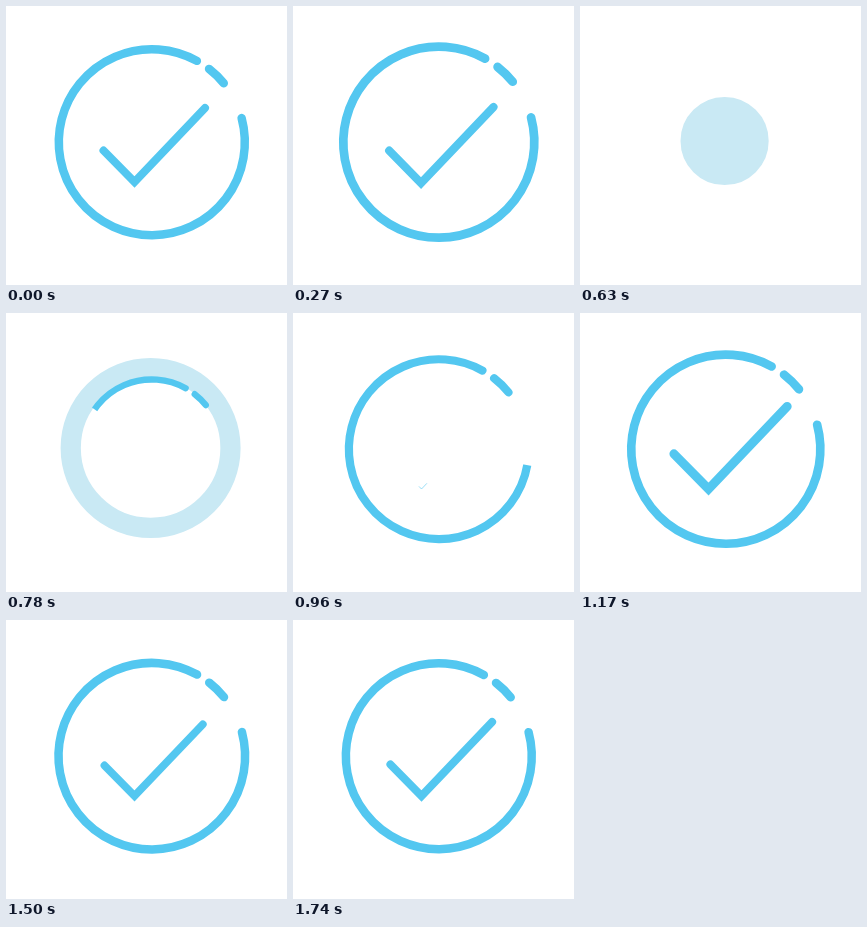
An HTML page that plays this animation: 281 px wide and 279 px high, repeating every 1770 ms.

```html
<!DOCTYPE html>
<html lang="en">
<head>
<meta charset="utf-8">
<title>Check mark</title>
<style>
  html, body { margin: 0; width: 100%; height: 100%; overflow: hidden; background: #fff; }
  svg { display: block; width: 100%; height: 100%; }
</style>
</head>
<body>
<svg viewBox="0 0 281 279" fill="none">
  <mask id="sweep" maskUnits="userSpaceOnUse" x="-120" y="-120" width="240" height="240">
    <path id="wedge" stroke="#fff" stroke-width="24"/>
  </mask>
  <circle id="disc" cx="144.6" cy="135" stroke="#c9e9f4"/>
  <g id="badge" stroke="#53c7f0" stroke-linecap="round">
    <g id="ring" stroke-width="8.5">
      <g mask="url(#sweep)"><path id="arcs"/></g>
    </g>
    <path id="tick" d="M97.5 144.5L128.5 176L199 102" stroke-width="8"/>
  </g>
</svg>
<script>
const LOOP = 1770, STEP = 30;
const CX = 145.8, CY = 136.2, RADIUS = 93, DISC = 90;
const PIVOT = [128.5, 176];
const el = id => document.getElementById(id);
const [disc, badge, ring, tick, wedge] = ['disc', 'badge', 'ring', 'tick', 'wedge'].map(el);

const clamp = x => Math.min(1, Math.max(0, x));
const progress = (t, from, to) => clamp((t - from) / (to - from));
const show = (node, on) => node.setAttribute('display', on ? 'inline' : 'none');
const scaleAt = (node, x, y, s) =>
  node.setAttribute('transform', `translate(${x} ${y}) scale(${s}) translate(${-x} ${-y})`);

// Counter-clockwise arc around the origin, in degrees
function arc(start, sweep) {
  const point = a => {
    const r = a * Math.PI / 180;
    return `${(RADIUS * Math.cos(r)).toFixed(3)} ${(RADIUS * Math.sin(r)).toFixed(3)}`;
  };
  return `M${point(start)}A${RADIUS} ${RADIUS} 0 ${sweep > 180 ? 1 : 0} 0 ${point(start - sweep)}`;
}

const backIn = p => p * p * (2.70158 * p - 1.70158);

// Damped oscillation that follows a scale-up
function bounce(ms, amount) {
  const s = ms / 1000;
  return 1 + amount * Math.sin(5 * Math.PI * s) * Math.exp(-6.5 * s);
}

function ringScale(t) {
  if (t >= 1010) return bounce(t - 1010, 0.08);
  if (t >= 960) return 0.967 + 0.033 * progress(t, 960, 1010);
  if (t >= 780) return 0.75 + 0.217 * progress(t, 780, 960);
  return 0.75 * progress(t, 630, 780);
}

const tickScale = t => t < 1150 ? progress(t, 945, 1150) : bounce(t - 1150, 0.43);

function render(t) {
  const entering = t >= 600;
  const out = entering ? 0 : progress(t, 240, 450);
  const size = entering ? ringScale(t) : 1;
  const tickSize = entering ? tickScale(t) : 1;
  const sweep = entering ? Math.min(345, Math.max(0, 1.137 * (t - 684))) : 345;

  show(badge, out < 1);
  scaleAt(badge, CX, CY, 1 - backIn(out));
  badge.setAttribute('opacity', 1 - out ** 2.4);

  show(ring, sweep > 0);
  ring.setAttribute('transform', `translate(${CX} ${CY}) scale(${size})`);
  wedge.setAttribute('d', arc(-36, sweep));

  show(tick, tickSize > 0);
  scaleAt(tick, ...PIVOT, tickSize);

  const outer = DISC * (1 - (1 - progress(t, 570, 780)) ** 2);
  const hole = RADIUS * size;
  show(disc, entering && t < 960 && hole < outer);
  disc.setAttribute('r', (outer + hole) / 2);
  disc.setAttribute('stroke-width', Math.max(0, outer - hole));
}

el('arcs').setAttribute('d', arc(-39.3, 12.7) + arc(-61, 314));

const begin = performance.now();
function tickClock() {
  const t = (performance.now() - begin) % LOOP;
  render(Math.floor(t / STEP) * STEP);
  requestAnimationFrame(tickClock);
}
tickClock();
</script>
</body>
</html>
```
